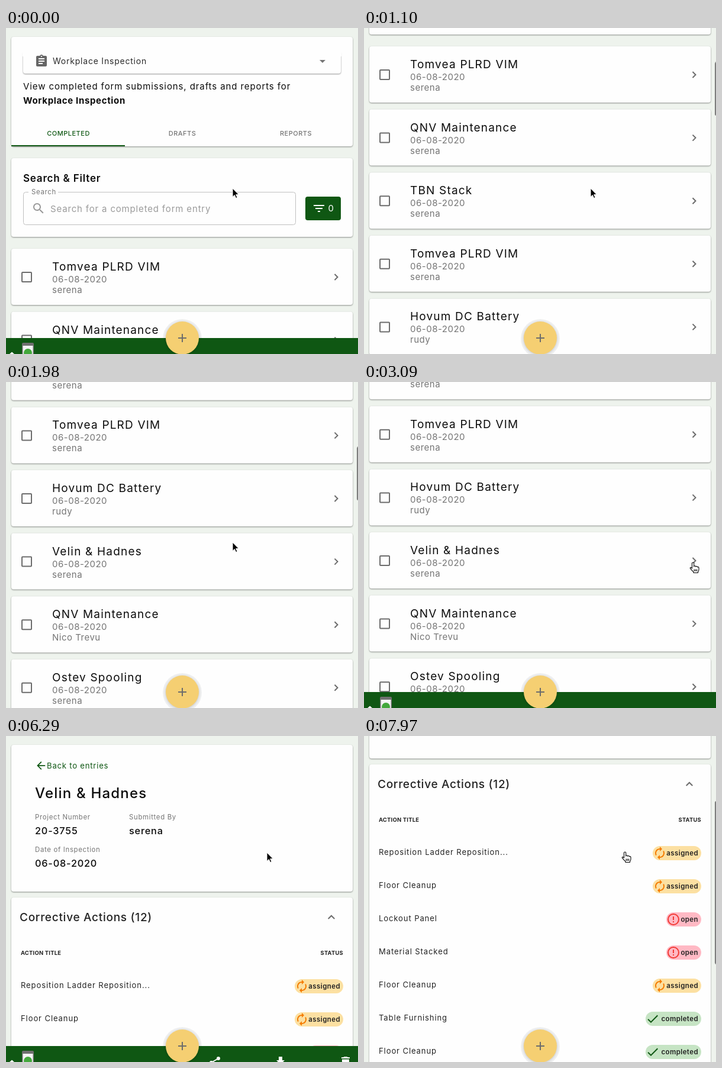
An HTML page for the animation above (8 s loop, 595x551 px).

```html
<!DOCTYPE html>
<html lang="en">
<head>
<meta charset="utf-8">
<title>Workplace Inspection</title>
<style>
/* A flick brakes evenly: the way left to its rest is gap squared */
@property --rest { syntax: '<number>'; inherits: true; initial-value: 0; }
@property --gap { syntax: '<number>'; inherits: true; initial-value: 0; }

:root {
  --green: #0f5713;
  --grey: #757575;
}
html, body { margin: 0; width: 100%; height: 100%; overflow: hidden; background: #eef3ed; }
svg { display: block; }
text { font: 400 15px Inter, "Open Sans", sans-serif; letter-spacing: .9px; fill: #0c0c0c; }

/* Type styles */
.pick { font-size: 14px; letter-spacing: .78px; fill: #2b2b2b; }
.strong { font-weight: 700; letter-spacing: .65px; }
.tab { font-size: 11px; font-weight: 500; letter-spacing: .5px; fill: var(--grey); text-anchor: middle; }
.heading { font-size: 17px; font-weight: 600; letter-spacing: .8px; }
.hint { fill: #9b9b9b; letter-spacing: .83px; }
.label { font-size: 11.4px; letter-spacing: .68px; fill: var(--grey); }
.title { font-size: 19px; letter-spacing: 1.18px; }
.meta { letter-spacing: .5px; fill: var(--grey); }
.back { font-size: 13.2px; letter-spacing: .75px; fill: var(--green); }
.name { font-size: 24px; font-weight: 500; letter-spacing: 1.2px; }
.value { font-size: 16.3px; font-weight: 500; letter-spacing: .8px; }
.section { font-size: 19px; font-weight: 500; letter-spacing: .72px; fill: #222; }
.column { font-size: 9.4px; font-weight: 700; letter-spacing: .25px; fill: #222; }
.row { font-size: 13px; letter-spacing: .92px; fill: #222; }
.chip { font-size: 11.5px; font-weight: 600; letter-spacing: .4px; fill: #222; }
.end { text-anchor: end; }
.active { fill: var(--green); }

.card { fill: #fefefe; filter: drop-shadow(0 1px .8px rgba(0, 0, 0, .42)); }
.line { fill: none; stroke: #6c6c6c; stroke-width: 2; }
.thumb { fill: #7d7d7d; }
.halo { fill: rgba(60, 70, 90, .07); }
.fab { filter: drop-shadow(0 1px 2px rgba(0, 0, 0, .2)); }

/* Motion: every track lasts one loop */
.view, .thumb, .footer, .tools, .cursor, .arrow, .hand { animation: 8s linear infinite; }
.view { --scroll: calc(var(--rest) - var(--gap) * var(--gap)); }
.content { transform: translateY(calc(var(--scroll) * -1px)); }

.list { animation-name: list-scroll, list-show; }
.detail { animation-name: detail-scroll, detail-show; }
.tools { animation-name: detail-show; }
.list .thumb { transform: translateY(calc(var(--scroll) * .168px)); animation-name: list-thumb; }
.detail .thumb { transform: translateY(calc(var(--scroll) * .488px)); animation-name: detail-thumb; }
.footer { animation-name: footer; }
.cursor { animation-name: cursor; }
.arrow { animation-name: arrow; }
.hand { animation-name: hand; }

@keyframes list-scroll {
  0% { --rest: 0; --gap: 0; animation-timing-function: step-end; }
  5.25% { --rest: 348.2; --gap: 18.66; animation-timing-function: steps(15, jump-start); }
  15.83% { --rest: 348.2; --gap: 0; animation-timing-function: step-end; }
  15.87% { --rest: 652; --gap: 17.66; animation-timing-function: steps(13, jump-both); }
  25.45%, 100% { --rest: 652; --gap: 0; }
}
@keyframes detail-scroll {
  0% { --rest: 0; --gap: 0; animation-timing-function: step-end; }
  86% { --rest: 156; --gap: 12.49; animation-timing-function: steps(14, jump-start); }
  96.1% { --rest: 156; --gap: 0; animation-timing-function: step-end; }
  97.5% { --rest: 156; --gap: 0; animation-timing-function: steps(4, jump-start); }
  100% { --rest: 225; --gap: 0; }
}
@keyframes list-show {
  0%, 54.249% { opacity: 1; }
  54.25%, 100% { opacity: 0; }
}
@keyframes detail-show {
  0%, 54.249% { opacity: 0; }
  54.25%, 100% { opacity: 1; }
}
@keyframes list-thumb {
  0%, 5.2% { opacity: 0; }
  5.25%, 29% { opacity: 1; }
  32.5%, 100% { opacity: 0; }
}
@keyframes detail-thumb {
  0%, 85.9% { opacity: 0; }
  86%, 100% { opacity: 1; }
}
@keyframes footer {
  0%, 5.2% { transform: translateY(0); }
  8.2%, 28.2% { transform: translateY(32px); }
  31.2%, 85.9% { transform: translateY(0); }
  88.9%, 100% { transform: translateY(32px); }
}
@keyframes cursor {
  0% { transform: translate(383px, 271px); }
  30.5% { transform: translate(383px, 271px); animation-timing-function: ease-in-out; }
  37.125% { transform: translate(556px, 306px); }
  65.75% { transform: translate(556px, 306px); animation-timing-function: ease-in-out; }
  70.5%, 76.9% { transform: translate(453px, 213px); }
  78.6%, 100% { transform: translate(441px, 197px); }
}
@keyframes arrow {
  0%, 38.62% { opacity: 1; }
  38.625%, 67.74% { opacity: 0; }
  67.75%, 88.39% { opacity: 1; }
  88.4%, 100% { opacity: 0; }
}
@keyframes hand {
  0%, 38.62% { opacity: 0; }
  38.625%, 67.74% { opacity: 1; }
  67.75%, 88.39% { opacity: 0; }
  88.4%, 100% { opacity: 1; }
}
</style>
</head>
<body>
<svg width="595" height="551" viewBox="0 0 595 551">
  <defs>
    <path id="assigned" fill="#f57c00" d="M12 6v3l4-4-4-4v3c-4.42 0-8 3.58-8 8 0 1.57.46 3.03 1.24 4.26L6.7 14.8c-.45-.83-.7-1.79-.7-2.8 0-3.31 2.69-6 6-6zm6.76 1.74L17.3 9.2c.44.84.7 1.79.7 2.8 0 3.31-2.69 6-6 6v-3l-4 4 4 4v-3c4.42 0 8-3.58 8-8 0-1.57-.46-3.03-1.24-4.26z"/>
    <g id="open" fill="none" stroke="#f23a35" stroke-width="2">
      <circle cx="12" cy="12" r="9"/>
      <path d="M12 7v6m0 2v2"/>
    </g>
    <path id="completed" fill="#0f5713" d="M9 16.2L4.8 12l-1.4 1.4L9 19 21 7l-1.4-1.4z"/>
  </defs>

  <g class="view list">
    <g class="content">
      <rect class="card" x="9" y="15" width="577" height="185" rx="4"/>
      <rect class="card" x="29" y="40" width="537" height="37" rx="4"/>
      <rect x="28" y="34" width="539" height="14" fill="#fefefe"/>
      <path transform="translate(48 44)" fill="#666" d="M19 3h-4.18C14.4 1.84 13.3 1 12 1s-2.4.84-2.82 2H5c-1.1 0-2 .9-2 2v14c0 1.1.9 2 2 2h14c1.1 0 2-.9 2-2V5c0-1.1-.9-2-2-2zm-7 0c.55 0 1 .45 1 1s-.45 1-1 1-1-.45-1-1 .45-1 1-1zm2 14H7v-2h7v2zm3-4H7v-2h10v2zm0-4H7V7h10v2z"/>
      <text class="pick" x="79" y="61">Workplace Inspection</text>
      <path fill="#757575" d="M530 54h10l-5 5z"/>
      <text x="29" y="104">View completed form submissions, drafts and reports for</text>
      <text class="strong" x="29" y="128">Workplace Inspection</text>
      <text class="tab active" x="105.5" y="182">COMPLETED</text>
      <text class="tab" x="298" y="182">DRAFTS</text>
      <text class="tab" x="490" y="182">REPORTS</text>
      <rect class="active" x="9" y="198" width="192" height="2"/>

      <rect class="card" x="9" y="220" width="577" height="133" rx="4"/>
      <text class="heading" x="29" y="260">Search &amp; Filter</text>
      <rect x="29.5" y="277.5" width="460" height="55" rx="4" fill="none" stroke="#c0c0c0"/>
      <rect x="38" y="275" width="50" height="5" fill="#fefefe"/>
      <text class="label" x="43" y="281">Search</text>
      <path transform="translate(43 293)" fill="#9a9a9a" d="M15.5 14h-.79l-.28-.27C15.41 12.59 16 11.11 16 9.5 16 5.91 13.09 3 9.5 3S3 5.91 3 9.5 5.91 16 9.5 16c1.61 0 3.09-.59 4.23-1.57l.27.28v.79l5 4.99L20.49 19l-4.99-5zm-6 0C7.01 14 5 11.99 5 9.5S7.01 5 9.5 5 14 7.01 14 9.5 11.99 14 9.5 14z"/>
      <text class="hint" x="75" y="311">Search for a completed form entry</text>
      <rect class="active" x="506" y="285" width="60" height="40" rx="4"/>
      <path fill="none" stroke="#fff" stroke-width="2" d="M520 300h18m-15 5h12m-8 5h4"/>
      <text x="544.5" y="310" style="fill:#fff">0</text>
      <g id="entries"></g>
    </g>
    <rect class="thumb" x="593" width="6" height="91" rx="3"/>
  </g>

  <g class="view detail">
    <g class="content">
      <rect class="card" x="9" y="15" width="577" height="248" rx="4"/>
      <path class="active" transform="translate(48.7 39.5) scale(.875)" d="M20 11H7.83l5.59-5.59L12 4l-8 8 8 8 1.41-1.41L7.83 13H20z"/>
      <text class="back" x="69" y="55">Back to entries</text>
      <text class="name" x="49" y="105">Velin &amp; Hadnes</text>
      <text class="label" x="49" y="141">Project Number</text>
      <text class="value" x="49" y="166">20-3755</text>
      <text class="label" x="208" y="141">Submitted By</text>
      <text class="value" x="208" y="166">serena</text>
      <text class="label" x="49" y="196">Date of Inspection</text>
      <text class="value" x="49" y="221">06-08-2020</text>

      <rect class="card" x="9" y="273" width="577" height="800" rx="4"/>
      <text class="section" x="23" y="313">Corrective Actions (12)</text>
      <path class="line" d="M544.7 309l5.3-5.3 5.3 5.3"/>
      <text class="column" x="25" y="370">ACTION TITLE</text>
      <text class="column end" x="570" y="370">STATUS</text>
      <g id="actions"></g>
    </g>
    <rect class="thumb" x="593" width="6" height="276" rx="3"/>
  </g>

  <circle class="halo" cx="298" cy="525" r="33"/>
  <g class="footer">
    <rect class="active" y="524" width="595" height="64"/>
    <path fill="#fff" d="M5.5 551.5l4.5-4 4.5 4z"/>
    <rect x="27" y="532" width="20" height="30" rx="2" fill="#707070"/>
    <rect x="28.5" y="537" width="17" height="22" fill="#f4f4f4"/>
    <circle cx="37" cy="549" r="7" fill="#43a83c"/>
    <g class="tools" fill="#fff">
      <path fill="none" stroke="#fff" stroke-width="2" d="M359 545l-12 7 12 7"/>
      <circle cx="359" cy="545" r="3"/>
      <circle cx="347" cy="552" r="3"/>
      <path d="M461 542h6v6h4l-7 7-7-7h4z"/>
      <path d="M567 543h3.5l1-1h5l1 1h3.5v2h-14zm1 3.5h12v14h-12z"/>
    </g>
  </g>

  <circle class="fab" cx="298" cy="524" r="28" fill="#f5cf72"/>
  <path class="line" d="M291 524h14m-7-7v14"/>

  <g class="cursor">
    <path class="arrow" stroke="#fff" d="M0 0v14.5l3.4-3.1 2.3 5.2 2.3-1-2.3-5h4.6z"/>
    <g class="hand" stroke="#000" stroke-width="1.1" stroke-linejoin="round">
      <path fill="#fff" d="M-1.5 9V.6a1.6 1.6 0 0 1 3.2 0V6q0-1.2 1.5-1.2T4.7 6.3q.2-.9 1.5-.8t1.5 1.5q.3-.6 1.2-.4T10 8v3q0 2-1.5 4v1.5H1V15Q-1 13.5-4.5 9.2q-.6-1.8 1-1.8z"/>
      <path d="M2.2 10.5v3.5m2.2-3.5v3.5m2.2-3.5v3.5"/>
    </g>
  </g>
</svg>

<script>
const entries = [
  ['Tomvea PLRD VIM', 'serena'],
  ['QNV Maintenance', 'serena'],
  ['TBN Stack', 'serena'],
  ['Tomvea PLRD VIM', 'serena'],
  ['Hovum DC Battery', 'rudy'],
  ['Velin &amp; Hadnes', 'serena'],
  ['QNV Maintenance', 'Nico Trevu'],
  ['Ostev Spooling', 'serena'],
];
const actions = [
  ['Reposition Ladder Reposition...', 'assigned'],
  ['Floor Cleanup', 'assigned'],
  ['Lockout Panel', 'open'],
  ['Material Stacked', 'open'],
  ['Floor Cleanup', 'assigned'],
  ['Table Furnishing', 'completed'],
  ['Floor Cleanup', 'completed'],
];
const chips = {
  assigned: { width: 82, fill: '#fce0a2' },
  open: { width: 59, fill: '#ffb9c4' },
  completed: { width: 94, fill: '#c6e4c4' },
};

const fill = (id, items, draw) => {
  document.getElementById(id).innerHTML = items.map(draw).join('');
};

fill('entries', entries, ([title, author], i) => `
  <g transform="translate(0 ${373 + i * 106.6})">
    <rect class="card" x="9" width="577" height="95" rx="4"/>
    <rect class="line" x="27" y="40" width="16" height="16" rx="1"/>
    <text class="title" x="78" y="37">${title}</text>
    <text class="meta" x="78" y="57">06-08-2020</text>
    <text class="meta" x="78" y="75">${author}</text>
    <path class="line" d="M555.5 43l5 5-5 5"/>
  </g>`);

fill('actions', actions, ([title, status], i) => {
  const { width, fill } = chips[status];
  const left = 570 - width;
  return `
  <g transform="translate(0 ${411 + i * 56})">
    <text class="row" x="25" y="15">${title}</text>
    <rect x="${left}" width="${width}" height="24" rx="12" fill="${fill}"/>
    <use href="#${status}" x="${left}"/>
    <text class="chip end" x="565" y="16">${status}</text>
  </g>`;
});
</script>
</body>
</html>
```
